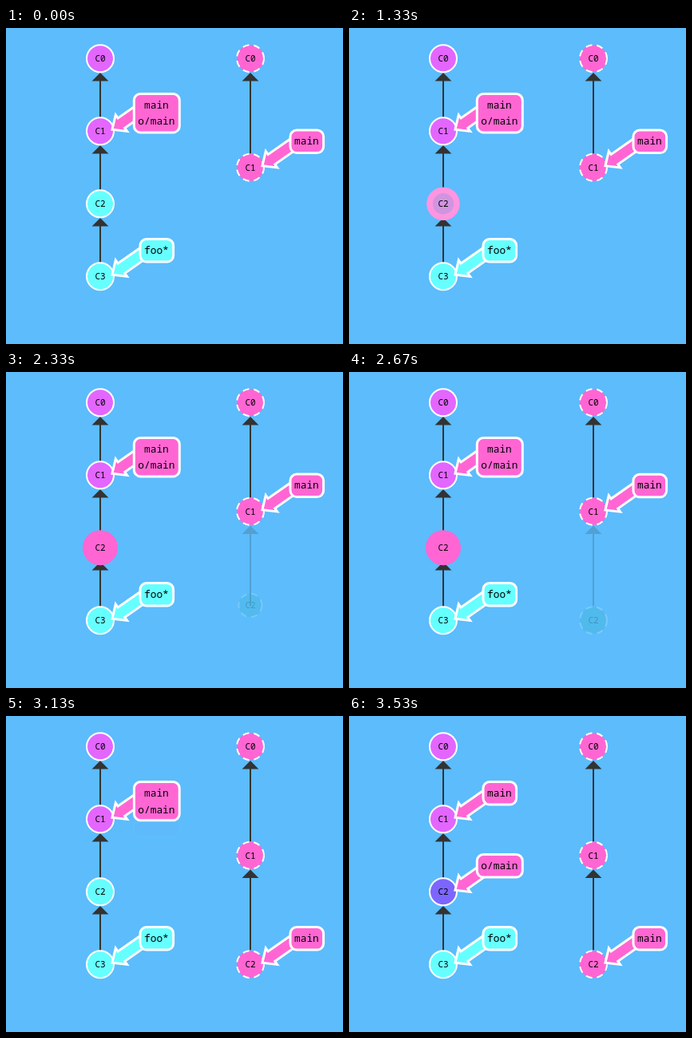
These frames come from a looping animation (422x396 px, 4.81 s). An HTML page:

```html
<!DOCTYPE html>
<html lang="en">
<head>
<meta charset="utf-8">
<title>Pushing a commit</title>
<style>
  /* Progress of each stage, 0 to 1 */
  @property --glow  { syntax: "<number>"; inherits: true; initial-value: 0; }
  @property --birth { syntax: "<number>"; inherits: true; initial-value: 0; }
  @property --edge  { syntax: "<number>"; inherits: true; initial-value: 0; }
  @property --move  { syntax: "<number>"; inherits: true; initial-value: 0; }
  @property --split { syntax: "<number>"; inherits: true; initial-value: 0; }

  :root {
    --pink: #ff66d3;
    --cyan: #66ffff;
    --violet: #e366ff;
    --blue: #7c66ff;
    --teal: #24b3b3;
  }
  html, body { margin: 0; width: 100%; height: 100%; overflow: hidden; background: #5cbcfc; }

  svg {
    display: block;
    width: 422px;
    height: 396px;
    animation: glow, birth, edge, move, split;
    animation-duration: 4810ms;
    animation-timing-function: ease-in-out;
    animation-iteration-count: infinite;
  }
  @keyframes glow {
    0%, 20.894% { --glow: 0; }
    31.871%, 55.301% { --glow: 1; }
    62.474%, 100% { --glow: 0; }
  }
  /* Parabolic bounces: fall, then rise and fall three times */
  @keyframes birth {
    0% { --birth: 0; }
    37.36% { --birth: 0; animation-timing-function: cubic-bezier(.3333, 0, .6667, .3333); }
    43.408% { --birth: 1; animation-timing-function: cubic-bezier(.3333, .6667, .6667, 1); }
    46.432% { --birth: .75; animation-timing-function: cubic-bezier(.3333, 0, .6667, .3333); }
    49.455% { --birth: 1; animation-timing-function: cubic-bezier(.3333, .6667, .6667, 1); }
    50.967% { --birth: .9375; animation-timing-function: cubic-bezier(.3333, 0, .6667, .3333); }
    52.48% { --birth: 1; animation-timing-function: cubic-bezier(.3333, .6667, .6667, 1); }
    53.235% { --birth: .9844; animation-timing-function: cubic-bezier(.3333, 0, .6667, .3333); }
    53.992%, 100% { --birth: 1; }
  }
  @keyframes edge {
    0%, 37.36% { --edge: 0; }
    45.676%, 100% { --edge: 1; }
  }
  @keyframes move {
    0%, 55.301% { --move: 0; }
    62.474%, 100% { --move: 1; }
  }
  @keyframes split {
    0%, 64.449% { --split: 0; }
    72.765%, 100% { --split: 1; }
  }

  text { font-family: "Noto Sans Mono", "DejaVu Sans Mono", monospace; text-anchor: middle; fill: #000; }
  .node circle { r: 17px; stroke: #fff; stroke-width: 2px; }
  .node text { font-size: 11px; }
  .remote circle { fill: var(--pink); stroke-dasharray: 8 6; }
  .violet { fill: var(--violet); }
  .cyan { fill: var(--cyan); }

  .edge { fill: #333; }
  .edge rect { x: -1px; y: 26px; width: 2px; }

  .label { fill: var(--pink); }
  .label rect, .label use { stroke: #fff; stroke-width: 3px; }
  .label rect { x: 50px; y: -46.7px; width: 41.6px; height: 28.6px; rx: 8px; }
  .label text { font-size: 12.8px; }
  .label.foo { fill: var(--cyan); }

  .sent circle {
    fill: color-mix(in srgb,
      color-mix(in srgb, var(--cyan), var(--pink) calc(var(--glow) * 100%)),
      var(--blue) calc(var(--split) * 100%));
    stroke: color-mix(in srgb, #fff, var(--pink) calc(var(--glow) * 100%));
    stroke-width: calc(2px + 8px * var(--glow));
  }

  .born { transform: translateY(calc(136.5px * var(--birth))); }
  .born circle {
    r: calc(17px * var(--birth));
    fill: color-mix(in srgb, var(--teal), var(--pink) calc(var(--move) * 100%));
  }
  .born circle, .born text { opacity: calc(.2 * var(--birth) + .8 * var(--move)); }
  .new-edge { opacity: calc(.2 * var(--edge) + .8 * var(--move)); }
  .new-edge rect { height: max(0px, calc(136.5px * var(--edge) - 44px)); }

  .advance { transform: translateY(calc(136.5px * var(--move))); }

  .stack rect {
    x: calc(42.3px + 7.7px * var(--split));
    width: calc(57px - 15.4px * var(--split));
  }
  .stack rect, .tracking rect { height: calc(48.4px - 19.8px * var(--split)); }
  .tracking { transform: translateY(calc(91px * var(--split))); }
  .tracking rect { x: 42.3px; width: 57px; }
  .tracking rect, .tracking use { opacity: var(--split); }
  .tracking .tag { transform: translateY(calc(20px - 20px * var(--split))); }
</style>
</head>
<body>
<svg viewBox="0 0 422 396">
  <defs>
    <path id="head" d="M0 19.3 L-8 27.3 H8 Z" stroke="#333" stroke-width="2"/>
    <!-- Pointer from the node's rim, turned toward the label -->
    <path id="pointer" transform="translate(15 -2) rotate(-35)"
          d="M0 0 L14 -12.5 V-7.5 H63 V7.5 H14 V12.5 Z"/>
  </defs>

  <!-- Local tree -->
  <g transform="translate(118 38.2)">
    <g class="edge"><use href="#head"/><rect height="48"/></g>
    <g class="edge" transform="translate(0 91)"><use href="#head"/><rect height="48"/></g>
    <g class="edge" transform="translate(0 182)"><use href="#head"/><rect height="48"/></g>

    <g class="node"><circle class="violet"/><text y="4">C0</text></g>
    <g class="node" transform="translate(0 91)"><circle class="violet"/><text y="4">C1</text></g>
    <g class="node" transform="translate(0 273)"><circle class="cyan"/><text y="4">C3</text></g>
    <g class="node sent" transform="translate(0 182)"><circle/><text y="4">C2</text></g>

    <g class="label foo" transform="translate(0 273)">
      <use href="#pointer"/><rect/><text x="70.4" y="-28.5">foo*</text>
    </g>
    <g transform="translate(0 91)">
      <g class="label stack">
        <use href="#pointer"/><rect/><text x="70.4" y="-28.5">main</text>
      </g>
      <g class="label tracking">
        <use href="#pointer"/>
        <g class="tag"><rect/><text x="70.4" y="-28.5">o/main</text></g>
      </g>
    </g>
  </g>

  <!-- Remote tree -->
  <g transform="translate(306 38.2)">
    <g class="edge"><use href="#head"/><rect height="93"/></g>
    <g transform="translate(0 136.5)">
      <g class="edge new-edge"><use href="#head"/><rect/></g>
      <g class="node remote born"><circle/><text y="4">C2</text></g>
      <g class="node remote"><circle/><text y="4">C1</text></g>
    </g>
    <g class="node remote"><circle/><text y="4">C0</text></g>
    <g transform="translate(0 136.5)">
      <g class="label advance">
        <use href="#pointer"/><rect/><text x="70.4" y="-28.5">main</text>
      </g>
    </g>
  </g>
</svg>
</body>
</html>
```
